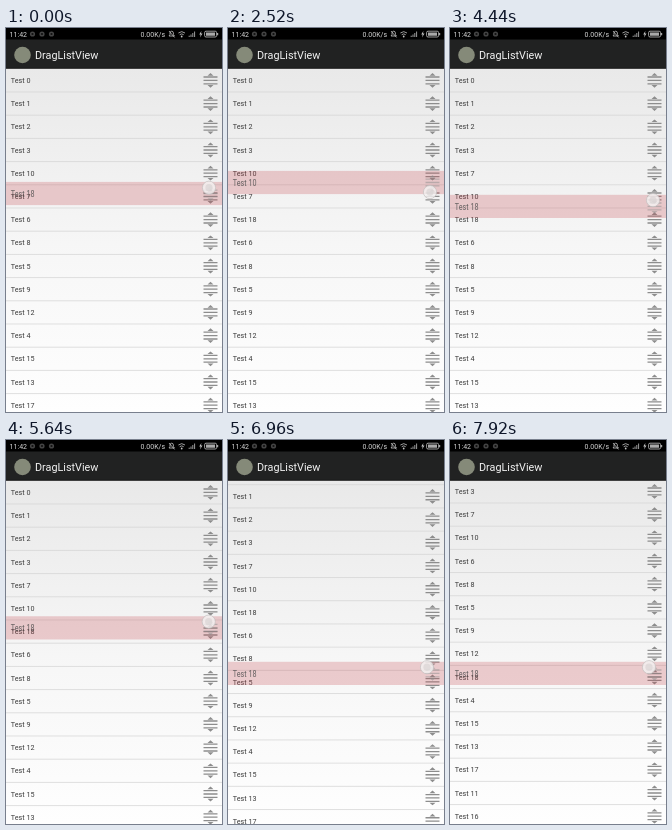
An HTML page that plays this animation: 216 by 384 pixels, repeating every 8 s.

```html
<!DOCTYPE html>
<html lang="en">
<head>
<meta charset="utf-8">
<title>DragListView</title>
<style>
html, body { margin: 0; width: 100%; height: 100%; overflow: hidden; background: #000; }
svg { display: block; width: 100vw; height: 100vh; }
text { font-family: Roboto, "Noto Sans", sans-serif; }
.row text { font-size: 7.2px; fill: #3c3c3c; }
.ghost text { fill: #4c4c4c; fill-opacity: .85; }
.status { font-size: 7px; fill: #d6d6d6; }
</style>
</head>
<body>
<svg viewBox="0 0 216 384" xmlns="http://www.w3.org/2000/svg">
  <defs>
    <linearGradient id="paper" x1="0" y1="0" x2="0" y2="1">
      <stop offset="0" stop-color="#e9e9e9"/>
      <stop offset=".55" stop-color="#f7f7f7"/>
      <stop offset="1" stop-color="#fefefe"/>
    </linearGradient>
    <clipPath id="view"><rect y="40.6" width="216" height="343.4"/></clipPath>
    <g id="grip">
      <path d="M197.5-3.4h14M197.5 0h14M197.5 3.4h14" stroke="#8d8d8d" stroke-width="1.3"/>
      <path d="M204.5-7.4l3 2.7h-6zM204.5 7.4l3-2.7h-6z" fill="#8d8d8d"/>
    </g>
  </defs>

  <rect y="40" width="216" height="344" fill="url(#paper)"/>
  <g id="list" clip-path="url(#view)"></g>

  <g id="ghost" class="row ghost">
    <rect y="-11.6" width="216" height="23.2" fill="#c4454d" fill-opacity=".25"/>
    <text x="4.8" y="2.6" transform="scale(1 1.35)"></text>
    <use href="#grip" opacity=".5"/>
  </g>
  <g id="touch">
    <circle r="6.6" fill="#f4f2f2" fill-opacity=".82" stroke="#c3bfbf" stroke-width=".7"/>
    <circle r="3.6" fill="#d5d1d1" fill-opacity=".6"/>
  </g>

  <rect width="216" height="12" fill="#000"/>
  <rect y="11.5" width="216" height="29" fill="#212222"/>
  <rect y="39.8" width="216" height=".8" fill="#151515"/>
  <circle cx="16.5" cy="27" r="8.3" fill="#858a79"/>
  <text x="29" y="30.5" font-size="10.8" fill="#f3f3f3">DragListView</text>

  <text class="status" x="3.6" y="8.6">11:42</text>
  <g fill="#444">
    <circle cx="26.5" cy="6" r="2.6"/><circle cx="36" cy="6" r="2.6"/><circle cx="45.5" cy="6" r="2.6"/>
  </g>
  <g fill="#111">
    <circle cx="26.5" cy="6" r="1.1"/><circle cx="36" cy="6" r="1.1"/><circle cx="45.5" cy="6" r="1.1"/>
  </g>
  <text class="status" x="134.5" y="8.6">0.00K/s</text>
  <g fill="none" stroke="#c4c4c4" stroke-width=".8">
    <path d="M163 8h5.4l-1-1.4v-1.6q-.2-1.8-1.7-1.8t-1.7 1.8v1.6zM163 3l5.5 6.4"/>
    <path d="M172.4 5q3.3-2.7 6.6 0M173.7 6.7q2-1.6 4 0"/>
    <path d="M183.2 9v-1.3M185 9v-2.5M186.8 9v-4M188.6 9v-5.5"/>
    <rect x="198.6" y="3.2" width="12" height="5.8" rx="1.4"/>
  </g>
  <circle cx="175.7" cy="8.5" r=".9" fill="#c4c4c4"/>
  <path d="M195.4 3l-2.2 3.6h1.5l-.7 2.9 2.5-3.9h-1.5z" fill="#c4c4c4"/>
  <path d="M200 4.5h9v3.2h-9zM211 5h1.2v2.2h-1.2z" fill="#a9a9a9"/>
</svg>
<script>
const LOOP = 8000, STEP = 120, ROW = 23.2, TOP = 52.4;
const $ = id => document.getElementById(id);
const list = $('list'), ghost = $('ghost'), touch = $('touch');
const label = ghost.querySelector('text');

const START = [0, 1, 2, 3, 10, 7, 6, 8, 5, 9, 12, 4, 15, 13, 17, 11, 16, 18, 14];
const DROPS = [
  { at: 1560, item: 18, to: 6 },
  { at: 2880, item: 10, to: 5 },
  { at: 7920, item: 18, to: 11 }
];
// keys: time, finger x, finger y; grab: row centre relative to the finger
const DRAGS = [
  { item: 18, grab: 5.8, from: 0, until: 1680, keys: [[0, 203, 159.7], [1440, 200, 187.4]] },
  { item: 10, grab: -9.6, from: 1920, until: 3000,
    keys: [[1920, 203, 155.2], [2160, 203, 155.2], [2520, 202, 164.1], [2880, 202, 171]] },
  { item: 18, grab: 6.2, from: 3600, until: LOOP,
    keys: [[3600, 203, 185.4], [3840, 203, 185.4], [4440, 203, 172.2], [4920, 203, 174],
           [5160, 203, 174], [6480, 202, 199.5], [6840, 199, 227.2]] }
];
const SCROLL = { from: 6600, speed: .0535 };

const rows = START.map((_, n) => {
  list.insertAdjacentHTML('beforeend',
    `<g class="row"><text x="4.8" y="2.6">Test ${n}</text><use href="#grip"/>` +
    '<path d="M0 11.6h216" stroke="#d3d3d3" stroke-width=".7"/></g>');
  return list.lastElementChild;
});

const ease = p => p * p * (3 - 2 * p);
const place = (el, x, y) => el.setAttribute('transform', `translate(${x} ${y})`);
const show = (el, on) => el.setAttribute('visibility', on ? 'visible' : 'hidden');

function finger(keys, t) {
  const i = keys.findIndex(k => k[0] > t);
  if (i < 0) return keys[keys.length - 1].slice(1);
  const a = keys[i - 1], b = keys[i];
  const p = ease((t - a[0]) / (b[0] - a[0]));
  return [a[1] + (b[1] - a[1]) * p, a[2] + (b[2] - a[2]) * p];
}

function orderAt(t) {
  const order = START.slice();
  for (const { at, item, to } of DROPS) {
    if (t < at) break;
    order.splice(order.indexOf(item), 1);
    order.splice(to, 0, item);
  }
  return order;
}

function draw(t) {
  const scroll = Math.max(0, t - SCROLL.from) * SCROLL.speed;
  orderAt(t).forEach((n, i) => place(rows[n], 0, TOP + i * ROW - scroll));

  const drag = DRAGS.find(d => t >= d.from && t < d.until);
  show(ghost, drag);
  show(touch, drag);
  if (!drag) return;
  const [x, y] = finger(drag.keys, t);
  label.textContent = 'Test ' + drag.item;
  place(ghost, 0, y + drag.grab);
  place(touch, x, y);
}

const begin = performance.now();
function tick() {
  const t = (performance.now() - begin) % LOOP;
  draw(Math.floor(t / STEP) * STEP);
  requestAnimationFrame(tick);
}
tick();
</script>
</body>
</html>
```
